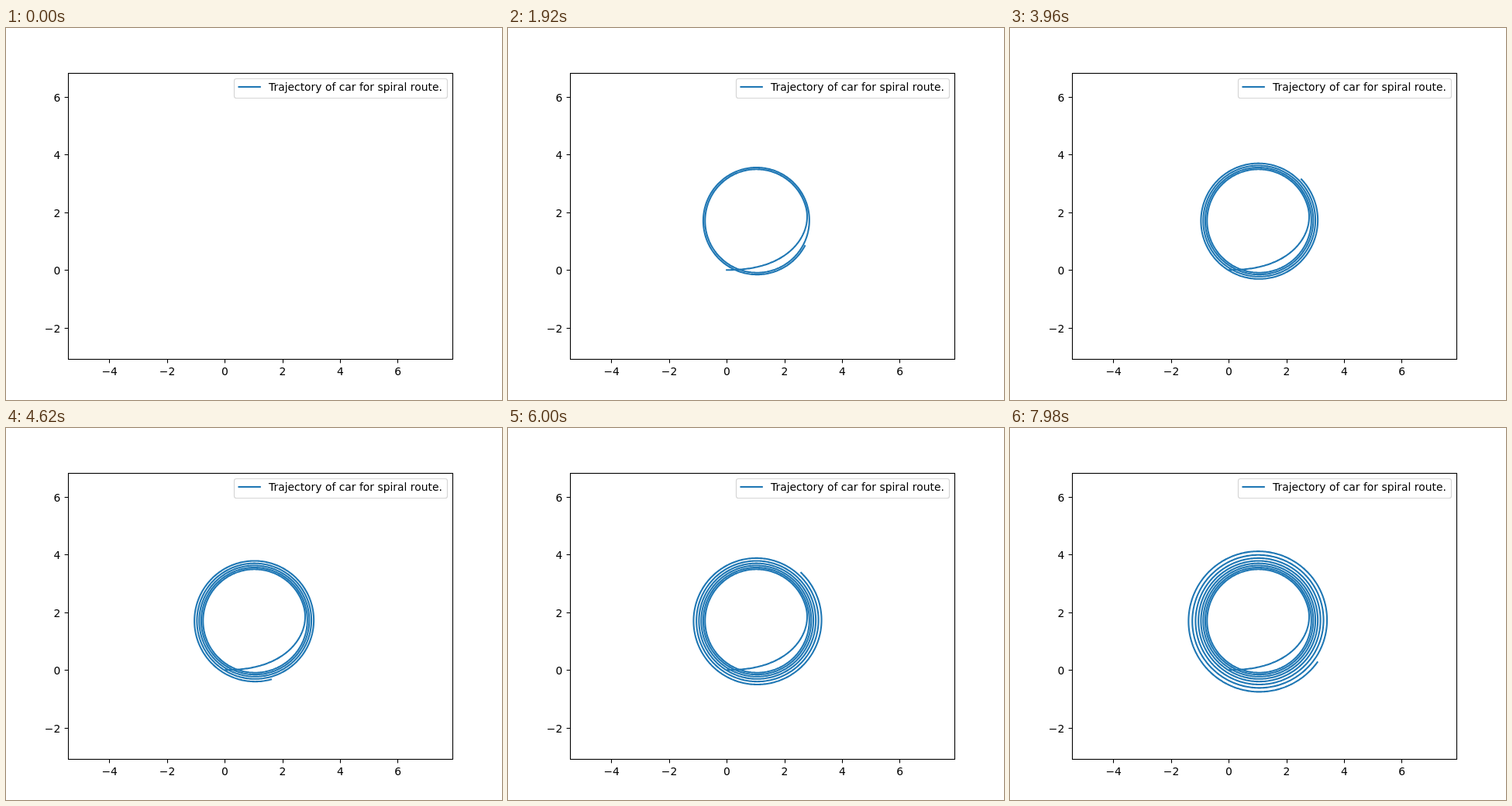
Animation, 640 px wide and 480 px high, one loop 8 s. Source, as an HTML page:

```html
<!DOCTYPE html>
<html lang="en">
<head>
<meta charset="utf-8">
<title>Spiral route</title>
<style>
  html, body { margin: 0; width: 100%; height: 100%; overflow: hidden; background: #fff; }
  svg { display: block; width: 640px; height: 480px; }
  text { font: 13.89px "DejaVu Sans", sans-serif; fill: #000; }
  .axis { fill: none; stroke: #000; stroke-width: 1.1; }
  .line { fill: none; stroke: #1f77b4; stroke-width: 2.083; stroke-linecap: square; stroke-linejoin: round; }
</style>
</head>
<body>
<svg id="stage" viewBox="0 0 640 480">
  <path id="route" class="line"/>
  <g id="axes"><rect class="axis" x="80.5" y="58.5" width="496" height="369"/></g>
  <rect x="294.5" y="65.5" width="275" height="25" rx="2.8" fill="#fff" fill-opacity=".8" stroke="#d6d6d6" stroke-width="1.2"/>
  <path class="line" d="M300.5 76H327.8"/>
  <text x="339" y="81">Trajectory of car for spiral route.</text>
</svg>
<script>
const LOOP = 8000, FRAME = 30, STEPS = 10, DT = 0.01;
const SCALE = 37.2, X0 = 282.2, Y0 = 312.2;
const px = x => X0 + x * SCALE;
const py = y => Y0 - y * SCALE;
const snap = v => Math.floor(v + 0.5) + 0.5;

const axes = document.getElementById('axes');
const route = document.getElementById('route');

function add(tag, attrs, label) {
  const el = document.createElementNS('http://www.w3.org/2000/svg', tag);
  for (const key in attrs) el.setAttribute(key, attrs[key]);
  if (label) el.textContent = label;
  axes.appendChild(el);
}

const tickLabel = v => String(v).replace('-', '\u2212');

for (let v = -4; v <= 6; v += 2) {
  const x = snap(px(v));
  add('path', { class: 'axis', d: `M${x} 427.5V432.4` });
  add('text', { x: px(v) + 0.3, y: 448, 'text-anchor': 'middle' }, tickLabel(v));
}
for (let v = -2; v <= 6; v += 2) {
  const y = snap(py(v));
  add('path', { class: 'axis', d: `M75.6 ${y}H80.5` });
  add('text', { x: 70.3, y: y + 5.3, 'text-anchor': 'end' }, tickLabel(v));
}

// Kinematic bicycle: steer in at 1 rad/s for a second, then ease off slowly.
function drive(count) {
  const speed = 4, base = 2, rear = 1.2;
  let x = 0, y = 0, theta = 0;
  const points = [];
  for (let i = 0; i <= count; i++) {
    points.push(px(x).toFixed(2) + ' ' + py(y).toFixed(2));
    const t = i * DT;
    const steer = t < 1 ? t : 1 - 0.01 * (t - 1);
    const slip = Math.atan(rear * Math.tan(steer) / base);
    x += speed * Math.cos(theta + slip) * DT;
    y += speed * Math.sin(theta + slip) * DT;
    theta += speed * Math.cos(slip) * Math.tan(steer) / base * DT;
  }
  return points;
}

const points = drive(Math.ceil(LOOP / FRAME) * STEPS);
let shown = -1;

function draw(time) {
  const n = Math.floor(time % LOOP / FRAME);
  if (n === shown) return;
  shown = n;
  route.setAttribute('d', n ? 'M' + points.slice(0, n * STEPS + 1).join('L') : '');
}

const start = performance.now();
function tick() {
  draw(performance.now() - start);
  requestAnimationFrame(tick);
}
tick();
</script>
</body>
</html>
```
